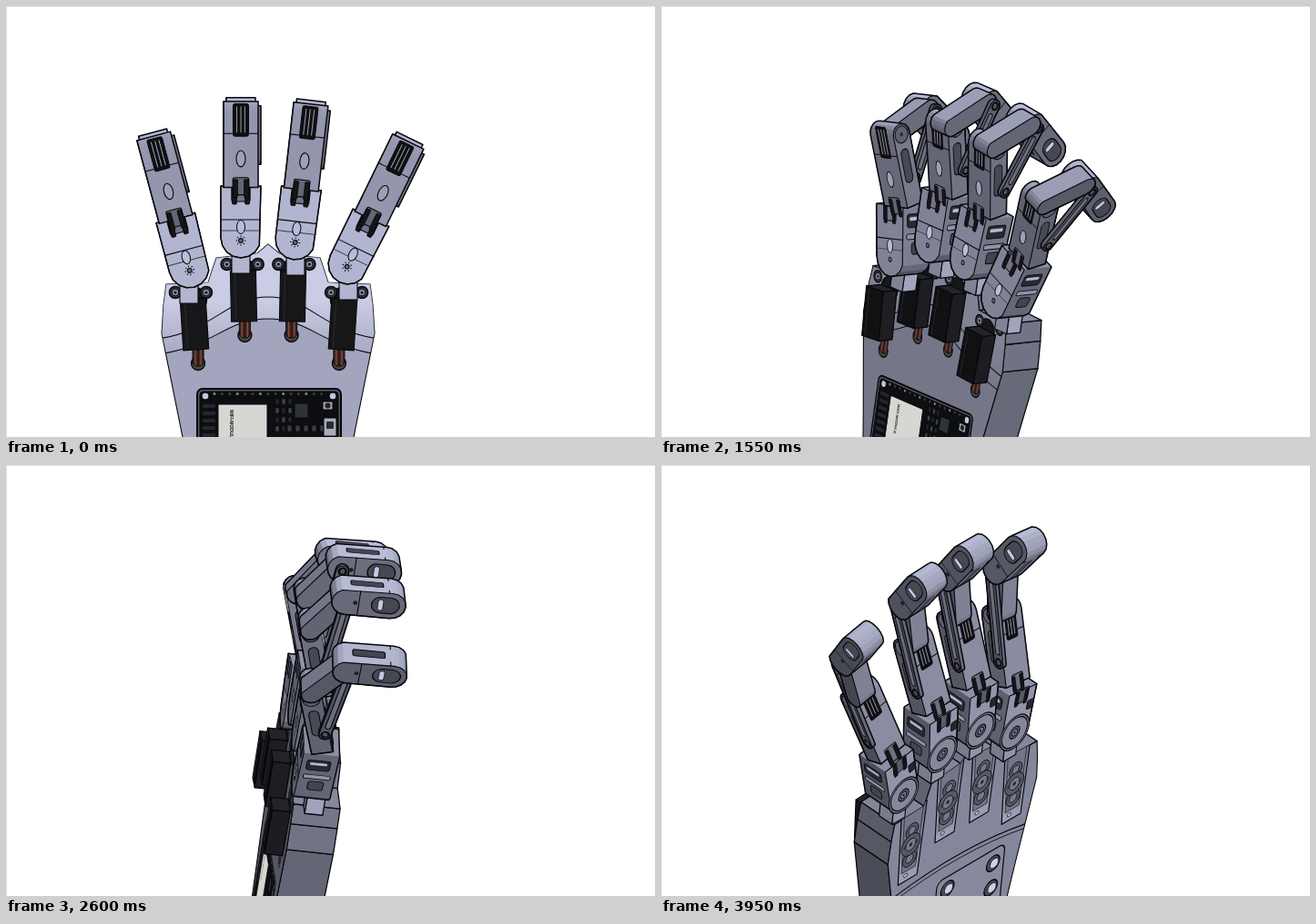
Write an HTML page with a canvas that moves like this. It is 713x474 px and loops after 4.4 s.

```html
<!DOCTYPE html>
<html lang="en">
<head>
<meta charset="utf-8">
<title>Robotic hand turning</title>
<style>
html, body { margin: 0; width: 100%; height: 100%; overflow: hidden; background: #fff; }
canvas { display: block; }
</style>
</head>
<body>
<canvas id="stage" width="713" height="474"></canvas>
<script>
const c = document.getElementById('stage').getContext('2d');
const LOOP = 4400, TURN = 3950, INK = '#08080c';
const STEPS = [0, 250, 400, 600, 700, 850, 1000, 1150, 1300, 1400, 1550, 1700, 1800, 1900, 2050, 2150,
  2300, 2400, 2500, 2600, 2700, 2800, 2950, 3050, 3150, 3250, 3350, 3500, 3600, 3700, 3850, 3950];

// Model space: x right, y up, z out of the back of the hand; the origin is the turning centre
const X = [1, 0, 0], Y = [0, 1, 0], Z = [0, 0, 1], DOWN = [0, -1, 0];
const CX = 288, CY = 441, THICK = 52;
const FINGERS = [
  { x: -87, y: 153, splay: -15 }, { x: -30, y: 186, splay: 0 },
  { x: 30, y: 184, splay: 6.5 }, { x: 88, y: 157, splay: 26 }];
const MOTORS = [[207, 350], [261, 319], [315, 319], [370, 350]];
const HALF = [[70, -160], [94, -33], [117, 81], [115, 112], [112, 135], [66, 137], [57, 164], [12, 169]];
const PALM = [...HALF, [0, 179], ...HALF.map(([x, y]) => [-x, y]).reverse()];

const rad = d => d * Math.PI / 180;
const scale = (v, k) => v.map(n => n * k);
const add = (...vs) => [0, 1, 2].map(i => vs.reduce((sum, v) => sum + v[i], 0));
const blend = (a, ka, b, kb) => add(scale(a, ka), scale(b, kb));

let s = 0, view = {};

function setView() {
  const swing = Math.sin(Math.PI * s);
  const yaw = rad(131 * s - 5 * swing), pitch = rad(39 * s);
  const roll = rad(9.5 * Math.sin(2.533 * s));
  view = {
    cy: Math.cos(yaw), sy: Math.sin(yaw), cp: Math.cos(pitch), sp: Math.sin(pitch),
    cr: Math.cos(roll), sr: Math.sin(roll), drift: 11 * swing - 12 * s
  };
}
function turn([x, y, z]) {
  const u = x * view.cy - z * view.sy, w = x * view.sy + z * view.cy;
  const up = y * view.cp - w * view.sp;
  return [u * view.cr + up * view.sr, u * view.sr - up * view.cr, y * view.sp + w * view.cp];
}
function project(p) {
  const r = turn(p);
  return [CX + r[0], CY + r[1] + view.drift];
}
const facing = n => turn(n)[2] > 0.02;

function tone(v) {
  const q = k => Math.max(0, Math.min(255, Math.round(v * k)));
  return `rgb(${q(.95)},${q(.97)},${q(1.11)})`;
}
// Lit from the viewer, with softer light from above and from the right
function shade(n, k = 1) {
  const [x, y, z] = turn(n).map((v, i) => Math.max(0, i === 1 ? -v : v));
  return tone(k * (86 + 84 * z * z + 62 * x * x + 105 * y * y));
}

function paint(fill, lw = 1.2, ink = INK) {
  if (fill) { c.fillStyle = fill; c.fill(); }
  if (lw) { c.lineWidth = lw; c.strokeStyle = ink; c.stroke(); }
}
function poly(pts, fill, lw, ink) {
  c.beginPath();
  pts.forEach(p => c.lineTo(p[0], p[1]));
  c.closePath();
  paint(fill, lw, ink);
}
function box(x, y, w, h, r, fill, lw) {
  c.beginPath();
  c.roundRect(x, y, w, h, r);
  paint(fill, lw);
}
function oval(x, y, rx, ry, fill, lw) {
  c.beginPath();
  c.ellipse(x, y, rx, ry, 0, 0, 7);
  paint(fill, lw);
}
function line(x0, y0, x1, y1, ink = INK, lw = 1.1) {
  c.beginPath();
  c.moveTo(x0, y0);
  c.lineTo(x1, y1);
  paint(null, lw, ink);
}
function bolt(x, y, r) {
  oval(x, y, r, r, '#34353d', 1.6);
  oval(x, y, r * .6, r * .6, '#8d90a2', 1);
  oval(x, y, r * .25, r * .25, '#111', 0);
}

// Flat drawing on a plane of the model
function onPlane(o, e1, e2, draw) {
  const a = turn(e1), b = turn(e2);
  c.save();
  c.transform(a[0], a[1], b[0], b[1], ...project(o));
  draw();
  c.restore();
}

function hull(pts) {
  const sorted = [...pts].sort((a, b) => a[0] - b[0] || a[1] - b[1]);
  const chain = list => {
    const out = [];
    for (const p of list) {
      while (out.length > 1) {
        const [a, b] = out.slice(-2);
        if ((b[0] - a[0]) * (p[1] - a[1]) > (b[1] - a[1]) * (p[0] - a[0])) break;
        out.pop();
      }
      out.push(p);
    }
    return out.slice(0, -1);
  };
  return [...chain(sorted), ...chain(sorted.reverse())];
}

// Counter-clockwise outline in e1, e2, drawn out along e3 from h0 to h1
function prism(o, e1, e2, e3, pts, h0, h1, cap, wall, smooth = true) {
  const level = h => pts.map(([x, y]) => project(add(o, scale(e1, x), scale(e2, y), scale(e3, h))));
  const low = level(h0), high = level(h1);
  pts.forEach(([x, y], i) => {
    const j = (i + 1) % pts.length;
    const dx = pts[j][0] - x, dy = pts[j][1] - y, len = Math.hypot(dx, dy);
    if (len < .01) return;
    const n = blend(e1, dy / len, e2, -dx / len);
    if (turn(n)[2] <= 0) return;
    const fill = shade(n, wall);
    poly([low[i], low[j], high[j], high[i]], fill, smooth ? .8 : 1.3, smooth ? fill : INK);
  });
  const top = turn(e3)[2] > 0;
  poly(top ? high : low, shade(scale(e3, top ? 1 : -1), cap), 1.1);
  if (smooth) poly(hull([...low, ...high]), null, 1.5);
}

// Bar outline with elliptical ends
function bar(r, length, up, down) {
  const pts = [];
  for (let k = 0; k <= 16; k++) {
    const a = Math.PI * (k > 8 ? k - 1 : k) / 8 * (k > 8 ? 1 : 1);
    pts.push([r * Math.cos(a), (k <= 8 ? length : 0) + (k <= 8 ? up : down) * Math.sin(a)]);
    if (k === 8) pts.push([-r, 0]);
  }
  return pts;
}
const block = (w, h) => [[-w / 2, -h / 2], [w / 2, -h / 2], [w / 2, h / 2], [-w / 2, h / 2]];

function ridges(y, w, h) {
  box(-w / 2, y, w, h, 2, '#101014', 1);
  for (const k of [-.26, 0, .26]) line(k * w, y + 3, k * w, y + h - 4, '#a9abb8', .9);
}
function prongs(y, w, k) {
  box(-w * .23, y - 2, w * .46, 19, 2, tone(k), 1.1);
  for (const x of [-.16, .16]) box(w * x - 2.5, y, 5, 20, 1, '#15151a', .8);
}

function drawBase(p, side, d, n) {
  const w = 44, L = 57, t = 20;
  prism(p, side, d, n, bar(w / 2, L, 0, w / 2), -t, t, 1.1, .82);
  const back = scale(d, -1);
  if (facing(side)) onPlane(add(p, scale(side, w / 2)), scale(n, -1), back, () => {
    box(-14, -48, 26, 15, 3, '#2a2b32', 1);
    box(-11, -45, 20, 5, 2, tone(190), .7);
    box(-15, -26, 30, 6, 2, tone(150), 1);
    box(-8, -16, 17, 13, 3, tone(70), 1);
  });
  if (facing(n)) onPlane(add(p, scale(n, t)), side, back, () => {
    prongs(-L, w, 120);
    line(-w / 2, -20, w / 2, -20);
    line(-w / 2, -8, w / 2, -8, '#33343c', .9);
    oval(0, -12, 4.5, 7.5, tone(195), 1);
    oval(0, 3, 2.4, 2.4, '#666977', 1.1);
    if (s < .05) for (let k = 0; k < 8; k++) {
      const x = Math.sin(k * Math.PI / 4), y = Math.cos(k * Math.PI / 4);
      line(x * 4, 3 + y * 4, x * 5.5, 3 + y * 5.5);
    }
  });
  else onPlane(add(p, scale(n, -t)), side, back, () => {
    prongs(-L, w, 95);
    box(-w / 2, -38, 10, 12, 2, '#25262d', 1);
    for (const [r, k] of [[23, 118], [20, 140], [8, 95], [4.5, 145]]) oval(0, 0, r, r, tone(k), 1.4);
    oval(0, 0, 1.8, 1.8, '#16161b', 0);
  });
}

function drawMiddle(p, side, d, n) {
  const w = 38, L = 82, r = 12;
  prism(p, side, d, n, [], 0, 0);
  prism(p, n, d, side, bar(r, L, r, 0), -w / 2, w / 2, .78, .92);
  const back = scale(d, -1);
  if (facing(side)) onPlane(add(p, scale(side, w / 2)), scale(n, -1), back, () => {
    oval(0, -L, 9.5, 9.5, tone(100), 1.2);
    oval(0, -L, 2, 2, '#222', 0);
    box(-6, -L + 17, 11, 38, 5, tone(75), 1.1);
  });
  const front = facing(n);
  onPlane(add(p, scale(n, front ? r : -r)), side, back, () => {
    ridges(-L - (front ? 11 : 6), 17, 36);
    prongs(-9, w, front ? 105 : 115);
    if (front) oval(0, -32, 5, 9, tone(165), 1.1);
    for (const x of [-w / 2, w * .24]) line(x, -60, x + w * .26, -60);
  });
}

function drawTip(p, side, d, n) {
  const w = 32, L = 50, r = 16;
  prism(p, n, d, side, bar(r, L, r, r), -w / 2, w / 2, .74, 1.04);
  const back = scale(d, -1);
  if (facing(side)) onPlane(add(p, scale(side, w / 2)), scale(n, -1), back, () => {
    box(-10, -L - 9, 20, 31, 10, tone(74), 1.3);
    box(-7, -L + 9, 14, 6, 3, tone(205), .8);
    line(-r, -14, r, -14);
    oval(0, -10, 2, 2, '#24252b', .8);
  });
  const front = facing(n);
  onPlane(add(p, scale(n, front ? r : -r)), side, back, () => {
    box(-5, -L + 10, 10, L - 14, 2, tone(72), 1.2);
    for (const x of [-w / 2, w * .3]) line(x, -L + 4, x + w * .2, -L + 4);
  });
}

function drawRod(a, b, side) {
  const v = blend(b, 1, a, -1), L = Math.hypot(...v), d = scale(v, 1 / L);
  // perpendicular to the rod and to the side axis
  const n = [d[1] * side[2] - d[2] * side[1], d[2] * side[0] - d[0] * side[2], d[0] * side[1] - d[1] * side[0]];
  prism(a, n, d, side, bar(7, L, 7, 7), 17, 22, .66, .7);
  if (facing(side)) onPlane(add(a, scale(side, 22)), n, scale(d, -1), () => {
    box(-3, -L + 9, 6, L - 18, 3, tone(112), 1.2);
    bolt(0, 0, 4.5);
    bolt(0, -L, 4.5);
  });
}

function drawFinger({ x, y, splay }) {
  const a = rad(splay * (1 - .5 * s));
  const side = [Math.cos(a), -Math.sin(a), 0], up = [Math.sin(a), Math.cos(a), 0];
  const bend = deg => {
    const q = rad(deg);
    return [blend(up, Math.cos(q), Z, -Math.sin(q)), blend(up, Math.sin(q), Z, Math.cos(q))];
  };
  const [d0, n0] = bend(0), [d1, n1] = bend(-8 - 14 * s);
  const [d2, n2] = bend(90 - 100 * s ** 1.5), [d3, n3] = bend(185 - 155 * s ** 1.15);
  const p0 = [x, y, -20], p1 = blend(p0, 1, d0, 57);
  const p2 = blend(p1, 1, d1, 82), p3 = blend(p2, 1, d2, 55);
  const link = add(p1, scale(d1, 30), scale(n1, -8));
  const parts = [
    [blend(p0, 1, d0, 28), () => drawBase(p0, side, d0, n0)],
    [blend(p1, 1, d1, 45), () => drawMiddle(p1, side, d1, n1)],
    [blend(p2, 1, d2, 27), () => prism(p2, n2, d2, side, bar(11, 55, 11, 11), -12, 12, .7, .9)],
    [blend(p3, 1, d3, 25), () => drawTip(p3, side, d3, n3)],
    [add(scale(link, .5), scale(p3, .5), scale(side, 20)), () => drawRod(link, p3, side)]];
  prism([x, y - 26, -26], X, Y, Z, block(20, 26), -10, 10, 1.1, 1.1, false);
  parts.sort((m, k) => turn(m[0])[2] - turn(k[0])[2]).forEach(part => part[1]());
}

function drawBoard() {
  box(210, 421, 158, 150, 6, '#555866', 2);
  box(213, 424, 152, 144, 4, '#0d0e11', 1);
  for (const x of [219, 359]) oval(x, 429, 4, 4, '#c3c6d8', 1);
  for (let k = 0; k < 15; k++) oval(229 + k * 8.4, 426.5, 1.5, 1.5, k % 3 ? '#4a3a30' : '#85878f', 0);
  for (let k = 0; k < 7; k++) box(216, 438 + k * 8, 14, 4, 1, '#24262b', 0);
  box(233, 438, 54, 120, 1, '#d6d6d3', 1);
  c.save();
  c.translate(246, 444);
  c.rotate(Math.PI / 2);
  c.fillStyle = '#15151a';
  c.font = 'bold 5px "Liberation Sans", sans-serif';
  c.fillText('WIFI-MODULE', 0, 0);
  c.restore();
  box(317, 437, 15, 16, 1, '#30323b', 1);
  for (let k = 0; k < 12; k++) box(296 + k % 3 * 7, 432 + (k / 3 | 0) * 10, 4, 6, 1, k % 2 ? '#43454e' : '#25262c', .6);
  for (let k = 0; k < 5; k++) box(309 + k * 9, 461, 5, 7, 1, '#3a3c44', .6);
  box(348, 435, 11, 9, 1, '#9b9dab', 1);
  oval(353.5, 439.5, 3, 3, '#202126', 0);
  box(349, 453, 14, 20, 1, '#a9acbc', 1);
  box(352, 457, 8, 8, 1, '#2b2c33', 0);
}

function clipPalm() {
  c.beginPath();
  PALM.forEach(([x, y]) => c.lineTo(CX + x, CY - y));
  c.closePath();
  c.clip();
}

function drawBackOfHand() {
  clipPalm();
  const glow = .6 * turn(Z)[2] ** 4;
  const arc = (y, rise) => {
    c.beginPath();
    c.moveTo(160, y);
    c.bezierCurveTo(230, y - 8, 240, y - rise, CX, y - rise);
    c.bezierCurveTo(336, y - rise, 346, y - 8, 416, y);
  };
  const g = c.createLinearGradient(0, 325, 0, 380);
  g.addColorStop(0, `rgba(228,230,255,${glow})`);
  g.addColorStop(1, `rgba(228,230,255,${glow * .15})`);
  arc(384, 40);
  c.lineTo(416, 200);
  c.lineTo(160, 200);
  paint(g, 0);
  arc(384, 40);
  paint(null, 1.1);
  arc(367, 47);
  paint(null, 1.1);
  for (const [x, y] of MOTORS) {
    const lean = (CX - x) / 20;
    oval(x + lean, y + 43, 7.5, 7.5, '#4a4245', 1.4);
    box(x + lean - 6, y + 24, 12, 22, 5, '#3a2a28', 1);
    for (const k of [-3, 0, 3]) line(x + lean + k, y + 26, x + lean + k, y + 45, k ? '#95492f' : '#2a1512', 1.3);
    oval(x, y - 27, 13.5, 13.5, '#17181b', 1.4);
    for (const k of [-17, 17]) bolt(x - lean + k, y - 35, 6.5);
  }
  drawBoard();
}

function drawInsideOfHand() {
  clipPalm();
  for (const [x, y] of MOTORS) {
    const g = c.createLinearGradient(x - 19, y - 50, x + 19, y + 50);
    g.addColorStop(0, tone(118));
    g.addColorStop(1, tone(168));
    poly([[x - 20, y - 52], [x + 20, y - 52], [x + 15, y + 50], [x - 15, y + 50]], g, 1.8);
    poly([[x - 15, y - 48], [x + 15, y - 48], [x + 11, y + 36], [x - 11, y + 36]], tone(122), .7);
    for (const [dy, r] of [[-20, 10], [20, 11], [0, 15]]) {
      oval(x, y + dy, r, r, tone(92), 1);
      oval(x, y + dy, r * .55, r * .55, tone(125), .9);
    }
    for (const k of [-9, 9]) oval(x + k, y, 2.5, 2.5, '#33343d', 0);
    oval(x, y, 2.5, 2.5, '#22232a', 0);
    oval(x + 4, y + 42, 3, 2.5, tone(205), .8);
  }
  for (const d of [0, 6]) {
    c.beginPath();
    c.moveTo(178, 421 + d);
    c.quadraticCurveTo(CX, 396 + d, 398, 416 + d);
    paint(null, d ? 1 : 1.8);
  }
  box(213, 431, 107, 140, 9, tone(142), 1.8);
  for (const [x, y] of [[230, 451], [230, 486], [302, 449], [302, 486]]) {
    oval(x, y, 10.5, 10.5, tone(75), 1.8);
    oval(x - 2, y + 1, 6.5, 6.5, tone(215), .8);
  }
}

function drawMotors() {
  for (const [x, y] of MOTORS) {
    const a = rad((x - CX) / 22);
    const e1 = [Math.cos(a), -Math.sin(a), 0], e2 = [Math.sin(a), Math.cos(a), 0];
    prism([x - CX, CY - y, 0], e1, e2, Z, block(28, 56), 0, 20, .14, .2, false);
    if (facing(Z)) onPlane([x - CX, CY - y, 20], e1, scale(e2, -1), () => {
      line(-9, -26, -9, 26, '#2c2d30', 1);
      if (s < .3) oval(0, -29, 1.6, 1.6, '#e8e8ee', 0);
    });
  }
}

function drawPalm() {
  const outside = facing(Z);
  if (!outside) drawMotors();
  prism([0, 0, 0], X, Y, Z, PALM, -THICK, 0, 1, .76, false);
  onPlane([-CX, CY, outside ? 0 : -THICK], X, DOWN, outside ? drawBackOfHand : drawInsideOfHand);
  if (outside) drawMotors();
}

function draw() {
  c.fillStyle = '#fff';
  c.fillRect(0, 0, 713, 474);
  c.lineJoin = 'round';
  setView();
  drawPalm();
  FINGERS.forEach(drawFinger);
  c.fillStyle = '#dedede';
  c.fillRect(0, 0, 713, 1);
  c.fillRect(0, 0, 1, 474);
}

let shown = -1;
const start = performance.now();
function tick() {
  const now = (performance.now() - start) % LOOP;
  const t = STEPS.findLast(v => v <= now) ?? 0;
  if (t !== shown) {
    shown = t;
    s = t / TURN;
    draw();
  }
  requestAnimationFrame(tick);
}
tick();
</script>
</body>
</html>
```
